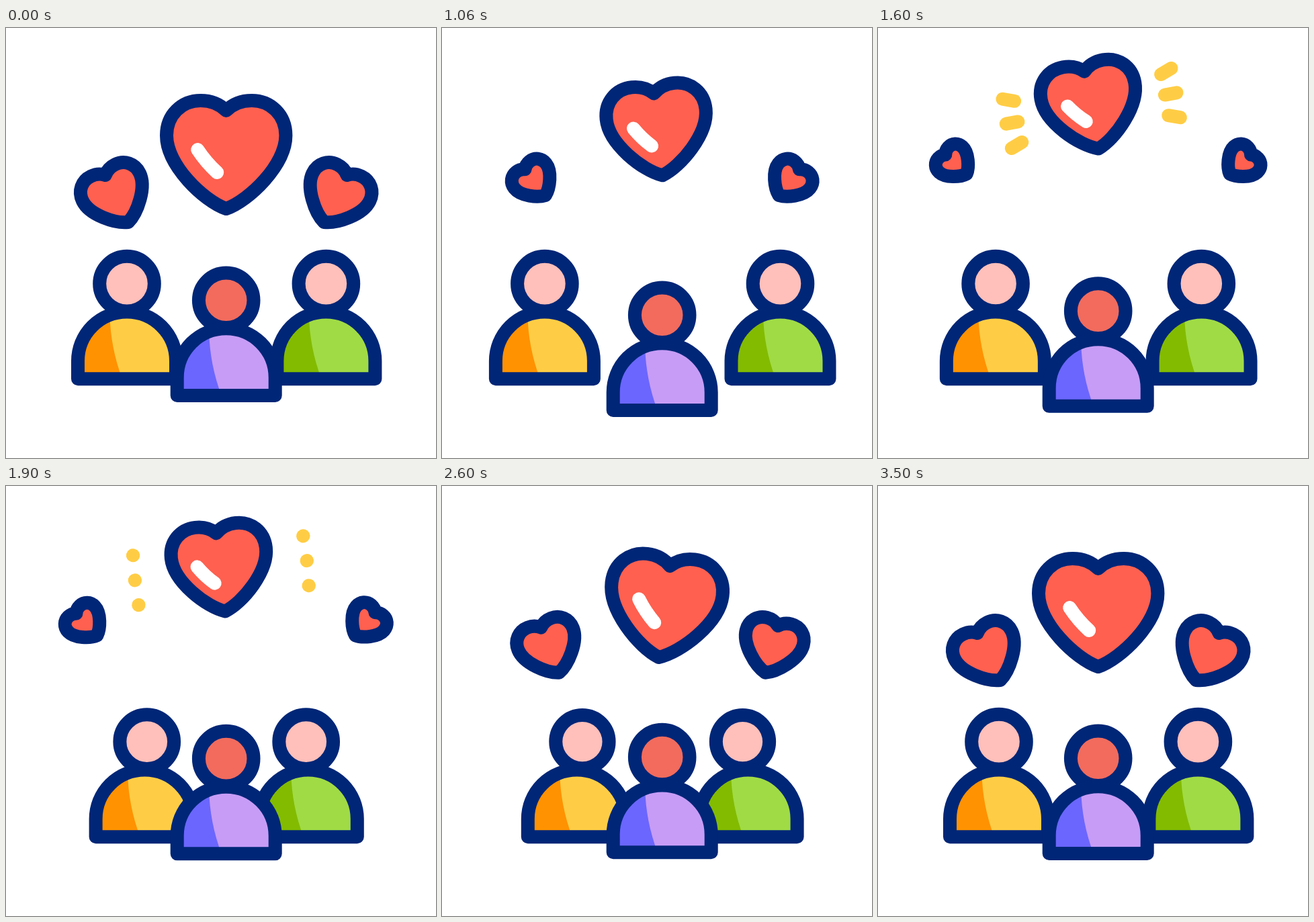
An HTML page with a canvas that plays this animation: 640 by 640 pixels, repeating every 3.6 s.

```html
<!DOCTYPE html>
<html lang="en">
<head>
<meta charset="utf-8">
<title>People and hearts</title>
<style>
  html, body { margin: 0; height: 100%; overflow: hidden; background: #fff; }
  canvas { display: block; width: 100vmin; height: 100vmin; }
</style>
</head>
<body>
<canvas id="stage" width="640" height="640"></canvas>
<script>
const LOOP = 3600, NAVY = '#002677', RED = '#ff604f', SUN = '#ffcd45', PINK = '#ffbfba';
const ctx = document.getElementById('stage').getContext('2d');
ctx.lineCap = ctx.lineJoin = 'round';

const mix = (a, b, k) => a + (b - a) * k;
const ramp = (t, a, b) => Math.min(1, Math.max(0, (t - a) / (b - a)));
const smooth = (t, a, b) => { const u = ramp(t, a, b); return u * u * (3 - 2 * u); };

// Accelerate to `far`, spring back to `near`, settle at zero.
function swing(t, far, near) {
  if (t < 1360) return far * ramp(t, 120, 1360) ** 1.5;
  if (t < 2040) return mix(near, far, (1 - ramp(t, 1360, 2040)) ** 1.5);
  return near * (1 - smooth(t, 2040, 3380));
}

const lift = t => smooth(t, 400, 1630) - smooth(t, 1700, 2900);
const shrink = (t, regrow) => smooth(t, 400, 1320) - smooth(t, regrow, 2900);
// Counter-lean that follows the main movement.
const sway = t => Math.sin(Math.PI * ramp(t, 1500, 3440)) ** 2;

const heartPath = new Path2D(`M0 0C-34-12-88.7-65-88.7-109C-88.7-140-66-161-38-161
  C-22-161-9-155 0-146C9-155 22-161 38-161C66-161 88.7-140 88.7-109C88.7-65 34-12 0 0Z`);
const shinePath = new Path2D('M-42.5-88Q-30-69-13.5-54');
const bodyPath = new Path2D('M-73 141.7V115A73 73 0 0 1 73 115V141.7Z');
const shadePath = new Path2D('M-73 141.7V115A73 73 0 0 1-25.5 46.6Q-24.5 95-7 141.7Z');

function paint(path, fill, stroke, width = 20) {
  if (fill) { ctx.fillStyle = fill; ctx.fill(path); }
  if (stroke) { ctx.strokeStyle = stroke; ctx.lineWidth = width; ctx.stroke(path); }
}

function scaled(path, k) {
  const result = new Path2D();
  result.addPath(path, new DOMMatrix([k, 0, 0, k, 0, 0]));
  return result;
}

function placed(x, y, degrees, draw) {
  ctx.save();
  ctx.translate(x, y);
  ctx.rotate(degrees * Math.PI / 180);
  draw();
  ctx.restore();
}

// The origin is the tip of the heart.
function heart(x, y, degrees, size) {
  placed(x, y, degrees, () => paint(scaled(heartPath, size), RED, NAVY));
}

function rays(t) {
  const end = mix(-9, 9, smooth(t, 1380, 1560)), start = mix(-9, 9, smooth(t, 1720, 1920));
  if (end <= start) return;
  for (const side of [0, 180]) for (const k of [-1, 0, 1]) {
    placed(0.5, -61, side + 16 * k, () => placed(120 + 4 * Math.abs(k), 0, 4 * k, () => {
      const line = new Path2D();
      line.moveTo(start, 0);
      line.lineTo(end, 0);
      paint(line, null, SUN);
    }));
  }
}

function bigHeart(t) {
  const k = lift(t), pivot = 34, size = 1 - 0.2 * shrink(t, 2100);
  placed(mix(327.7, 322, k), mix(269, 180, k) - pivot, 9 * sway(t) - 10.6 * k, () => {
    ctx.translate(0, pivot);
    rays(t);
    heart(0, 0, 0, size);
    paint(scaled(shinePath, size), null, '#fff');
  });
}

function smallHeart(t, side, swayAngle) {
  const k = lift(t), size = 0.533 * (1 - 0.455 * shrink(t, 1700));
  heart(327.7 + side * mix(145.7, 196, k), mix(289, 217, k),
    side * (26 + 22 * k - swayAngle * sway(t)), size);
}

// The origin is the centre of the resting head.
function person(x, y, skin, light, dark, lean = 0) {
  placed(x, y, 0, () => {
    const head = new Path2D();
    head.arc(lean, 0, 40.8 - Math.abs(lean) / 7, 0, 7);
    paint(head, skin, NAVY);
    paint(bodyPath, light);
    paint(shadePath, dark);
    paint(bodyPath, null, NAVY);
  });
}

function draw(t) {
  ctx.fillStyle = '#fff';
  ctx.fillRect(0, 0, 640, 640);
  const lean = 8.5 * sway(t), x = swing(t, -41, 33.5);
  person(180 + x, 380.6, PINK, SUN, '#ff9200', lean);
  person(476.4 - x, 380.6, PINK, '#a0db45', '#82bb00', -lean);
  person(327.7, 405.3 + swing(t, 33.3, -3), '#f26b5d', '#c79cf7', '#6b66fd');
  smallHeart(t, -1, 8);
  smallHeart(t, 1, 15);
  bigHeart(t);
}

const began = performance.now();
function tick() {
  draw((performance.now() - began) % LOOP);
  requestAnimationFrame(tick);
}
tick();
</script>
</body>
</html>
```
